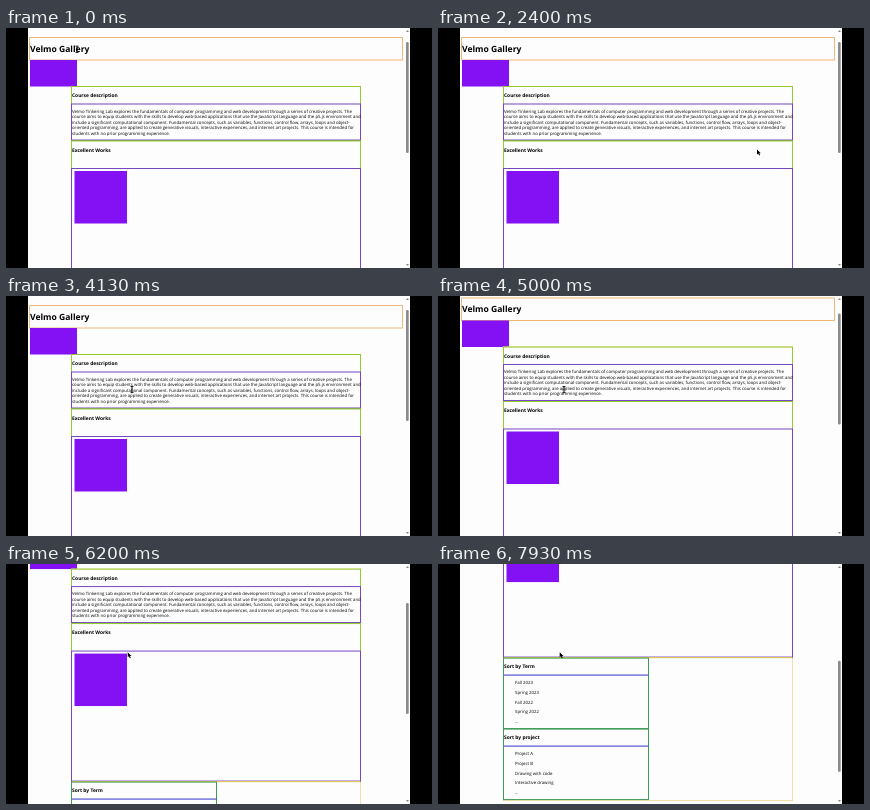
Write an HTML page with a canvas that moves like this. It is 426x240 px and loops after 8 s.

```html
<!DOCTYPE html>
<html lang="en">
<head>
<meta charset="utf-8">
<title>Gallery page scroll</title>
<style>
  html, body { margin: 0; width: 100%; height: 100%; overflow: hidden; background: #000; }
  canvas { display: block; width: 100vw; height: 100vh; }
</style>
</head>
<body>
<canvas id="stage" width="426" height="240"></canvas>
<script>
const ctx = document.getElementById('stage').getContext('2d');
const LOOP = 8000, STEP = 1000 / 15;
const FONT = '"Open Sans", "Noto Sans", sans-serif';
const PURPLE = '#8410f4', LIME = '#93cc30', VIOLET = '#7548c0',
      GREEN = '#3c9a55', BLUE = '#3434c8', GOLD = '#e8c95c';

const description = [
  'Velmo Tinkering Lab explores the fundamentals of computer programming and web development through a series of creative projects. The',
  'course aims to equip students with the skills to develop web-based applications that use the JavaScript language and the p5.js environment and',
  'include a significant computational component. Fundamental concepts, such as variables, functions, control flow, arrays, loops and object-',
  'oriented programming, are applied to create generative visuals, interactive experiences, and internet art projects. This course is intended for',
  'students with no prior programming experience.'
];
const lists = [
  { y: 271.5, title: 'Sort by Term', items: ['Fall 2023', 'Spring 2023', 'Fall 2022', 'Spring 2022', '...'] },
  { y: 342.5, title: 'Sort by project', items: ['Project A', 'Project B', 'Drawing with code', 'Interactive drawing', '...'] }
];

// Keys: [time, value, ...]; the scroll key holds the square root of the offset.
const scrollKeys = [[4300, 0], [5000, 2.74], [6200, 7.31], [7930, 13.32]];
const pointerKeys = [
  [1600, 71, 21], [2250, 319, 121.5], [2450, 319, 121.5],
  [3130, 126, 93.3], [5300, 126, 93.3], [5700, 121.7, 88.3]
];

const smooth = p => p * p * (3 - 2 * p);
const linear = p => p;

function sample(keys, t, ease) {
  if (t <= keys[0][0]) return keys[0].slice(1);
  for (let i = 1; i < keys.length; i++) {
    const a = keys[i - 1], b = keys[i];
    if (t <= b[0]) {
      const p = ease((t - a[0]) / (b[0] - a[0]));
      return a.slice(1).map((v, k) => v + (b[k + 1] - v) * p);
    }
  }
  return keys[keys.length - 1].slice(1);
}

function box(x, y, right, bottom, color) {
  ctx.strokeStyle = color;
  ctx.lineWidth = 1;
  ctx.strokeRect(x, y, right - x, bottom - y);
}

function fill(x, y, w, h, color) {
  ctx.fillStyle = color;
  ctx.fillRect(x, y, w, h);
}

function text(str, x, y, size = 4.33, weight = 400) {
  ctx.font = `${weight} ${size}px ${FONT}`;
  ctx.fillStyle = '#000';
  ctx.fillText(str, x, y);
}

const heading = (str, y) => text(str, 66, y, 4.9, 700);

function drawPage() {
  box(23.5, 9.5, 396.5, 32, '#efb878');
  text('Velmo Gallery', 24, 24, 8.57, 700);
  fill(24, 32, 47, 26.5, PURPLE);

  box(65.5, 58.5, 354.5, 414, '#f2dfa4');
  box(65.5, 58.5, 354.5, 112.5, LIME);
  heading('Course description', 69.3);
  box(65.5, 76, 354.5, 112, VIOLET);
  description.forEach((line, i) => text(line, 66, 84.7 + i * 5.5));

  box(65.5, 113, 354.5, 271, LIME);
  heading('Excellent Works', 123.8);
  box(65.5, 140.5, 354.5, 270.5, VIOLET);
  fill(66, 270.5, 288, 1, GOLD);
  fill(68.5, 143, 52.5, 52.5, PURPLE);

  for (const { y, title, items } of lists) {
    box(65.5, y, 210.5, y + 70.5, GREEN);
    heading(title, y + 10.3);
    fill(66, y + 16.5, 144.5, 1, BLUE);
    items.forEach((item, i) => text(item, 77, y + 26.2 + i * 9.7));
  }
}

function triangle(x, y, h) {
  ctx.fillStyle = '#888';
  ctx.beginPath();
  ctx.moveTo(x, y);
  ctx.lineTo(x - 1.5, y + h);
  ctx.lineTo(x + 1.5, y + h);
  ctx.fill();
}

function drawScrollbar(scroll) {
  triangle(401.5, 2, 2);
  triangle(401.5, 238, -2);
  ctx.fillStyle = '#8b8b8f';
  ctx.beginPath();
  ctx.roundRect(400, 14 + scroll * 0.467, 2.7, 111, 1.2);
  ctx.fill();
}

function drawPointer(x, y, beam) {
  if (beam) {
    fill(x - 0.5, y - 3, 1, 6.5, '#000');
    fill(x - 1.5, y - 3.3, 3, 0.8, '#000');
    fill(x - 1.5, y + 3, 3, 0.8, '#000');
    return;
  }
  ctx.fillStyle = '#000';
  ctx.beginPath();
  [[0, 0], [0, 5], [1.2, 4], [2.1, 6], [3.1, 5.5], [2.2, 3.7], [3.8, 3.7]]
    .forEach(([dx, dy]) => ctx.lineTo(x + dx, y + dy));
  ctx.fill();
}

function draw(t) {
  const scroll = sample(scrollKeys, t, linear)[0] ** 2;
  const [x, y] = sample(pointerKeys, t, smooth);
  const beam = t < 1730 || (t > 3000 && t < 5500);

  fill(0, 0, 426, 240, '#000');
  ctx.save();
  ctx.beginPath();
  ctx.rect(22, 0, 382, 240);
  ctx.clip();
  fill(22, 0, 382, 240, '#fdfdfd');
  ctx.save();
  ctx.translate(0, -scroll);
  drawPage();
  ctx.restore();
  drawScrollbar(scroll);
  drawPointer(x, y, beam);
  ctx.restore();
}

ctx.textRendering = 'geometricPrecision';
const start = performance.now();
function tick() {
  const t = Math.max(0, performance.now() - start) % LOOP;
  draw(Math.floor((t + 5) / STEP) * STEP);
  requestAnimationFrame(tick);
}
tick();
</script>
</body>
</html>
```
